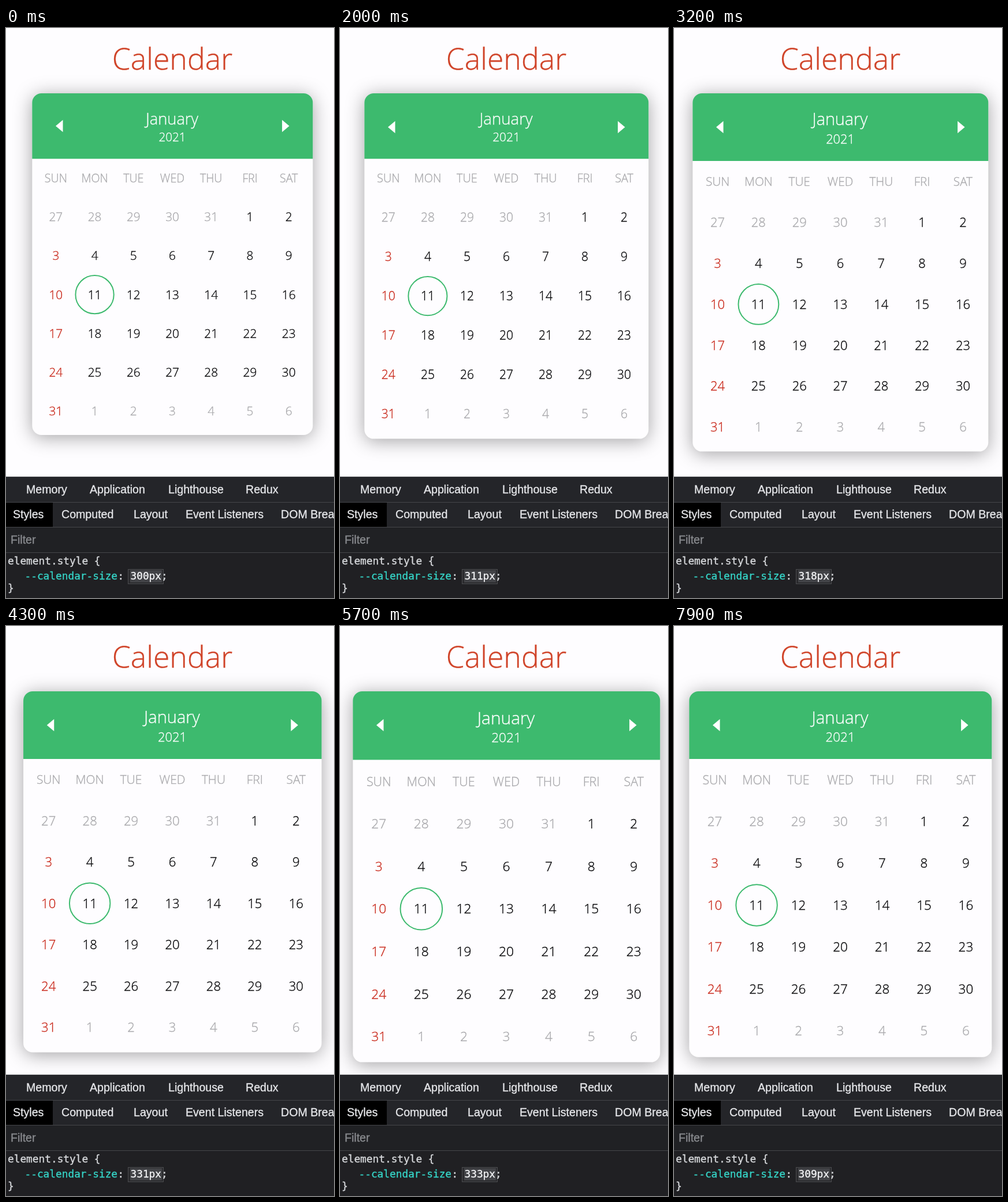
These frames come from a looping animation (568x986 px, 8000 ms). An HTML page:

```html
<!DOCTYPE html>
<html lang="en">
<head>
<meta charset="utf-8">
<title>Calendar</title>
<style>
  html, body { margin: 0; width: 100%; height: 100%; overflow: hidden; background: #fefdff; }
  svg { display: block; width: 100%; height: 100%; }
  text { fill: currentColor; stroke: currentColor; stroke-width: .35px; }
  .light { font-family: "Open Sans", sans-serif; font-weight: 300; text-anchor: middle; }
  .ui { font: 19.6px "Liberation Sans", Arial, sans-serif; color: #e6e7ea; }
  .code { font: 17.8px "DejaVu Sans Mono", monospace; color: #d8dadd; white-space: pre; }
  #card { fill: #fefdff; filter: drop-shadow(0 4px 16px rgba(0, 0, 0, .36)); }
</style>
</head>
<body>
<svg id="stage" viewBox="0 0 568 986" preserveAspectRatio="none">
  <text class="light" x="288" y="71.5" font-size="51.8" color="#d04429">Calendar</text>
  <rect id="card" y="113" rx="16"/>
  <path id="head" fill="#3dba6e"/>
  <path id="arrows" fill="#fff"/>
  <g id="labels" class="light"></g>
  <circle id="ring" fill="none" stroke="#3dba6e" stroke-width="2"/>

  <rect y="776" width="568" height="210" fill="#242529"/>
  <rect y="907" width="568" height="79" fill="#202023"/>
  <rect y="864" width="568" height="43" fill="#202124"/>
  <rect y="821" width="81" height="42" fill="#000"/>
  <path d="M0 776.5H568M0 820.5H568M0 863.5H568M0 907.5H568" stroke="#45464a"/>
  <g id="tabs" class="ui"></g>
  <text class="ui" x="8" y="892" style="color:#898b8f">Filter</text>
  <g class="code">
    <text x="3" y="927.5">element.style {</text>
    <text x="32.5" y="953.5" color="#35d4c7">--calendar-size</text>
    <text x="193.5" y="953.5">:</text>
    <rect x="211.5" y="936.5" width="61" height="25" fill="#2a2a2d" stroke="#4c4d50"/>
    <rect x="215" y="938" width="55" height="21" fill="#424347"/>
    <text id="value" x="215.5" y="953.5" color="#f4f5f7"></text>
    <text x="269" y="953.5">;</text>
    <text x="3" y="975">}</text>
  </g>
</svg>
<script>
const LOOP = 8000, STEP = 100, CX = 288, TOP = 113, R = 16;
const $ = id => document.getElementById(id);

// [time, value] points: the typed property and the card width that eases after it
const typed = [[0, 300], [400, 305], [1000, 305], [1240, 302], [1300, 302], [2000, 311],
  [2560, 318], [3260, 318], [4300, 331], [4860, 338], [5260, 333], [5980, 333],
  [6700, 324], [7900, 309]];
const widths = [[0, 486], [400, 488], [900, 493], [1500, 494], [2000, 492], [2500, 499],
  [3200, 512], [3700, 514.5], [4300, 516.5], [4800, 520], [5700, 532], [6100, 537],
  [6700, 534.5], [7300, 530], [7900, 524]];

function sample(points, t) {
  const i = points.findIndex(p => p[0] > t);
  if (i < 0) return points[points.length - 1][1];
  const [t0, a] = points[i - 1], [t1, b] = points[i];
  return a + (b - a) * (t - t0) / (t1 - t0);
}

function set(el, attrs) {
  for (const key in attrs) el.setAttribute(key, attrs[key]);
}

function addText(parent, text, attrs) {
  const el = document.createElementNS("http://www.w3.org/2000/svg", "text");
  el.textContent = text;
  set(el, attrs);
  return parent.appendChild(el);
}

function place(el, x, middle, size) {
  set(el, { x, y: middle + size * .357, "font-size": size });
}

[["Memory", 35], ["Application", 145], ["Lighthouse", 281], ["Redux", 415]]
  .forEach(([name, x]) => addText($("tabs"), name, { x, y: 805 }));
[["Styles", 12], ["Computed", 96], ["Layout", 221], ["Event Listeners", 311], ["DOM Breakpoints", 476]]
  .forEach(([name, x]) => addText($("tabs"), name, { x, y: 848 }));

const month = addText($("labels"), "January", { color: "#fff" });
const year = addText($("labels"), "2021", { color: "#fff" });
const weekdays = ["SUN", "MON", "TUE", "WED", "THU", "FRI", "SAT"]
  .map(name => addText($("labels"), name, { color: "#a9a9ac" }));
const days = Array.from({ length: 42 }, (_, i) => {
  const day = new Date(2021, 0, i - 4);
  const color = day.getMonth() ? "#a9a9ac" : i % 7 ? "#08080a" : "#c92a1c";
  return addText($("labels"), day.getDate(), { color });
});

function draw(t) {
  const w = sample(widths, t), left = CX + .3 - w / 2, right = left + w;
  // header text snaps to whole line heights
  const snap = w < 502 ? 0 : w < 528 ? 1 : 2;
  const base = TOP + [113.3, 117, 118.5][snap];
  const weekY = [260, 266, 269][snap];
  const pitch = w * .1383;
  const column = i => CX + (i % 7 - 3) * pitch;
  const row = i => weekY + (Math.floor(i / 7) + 1) * pitch - .5;

  set($("card"), { x: left, width: w, height: 591 + 1.1 * (w - 486) });
  set($("head"), { d: `M${left} ${base}V${TOP + R}a${R} ${R} 0 0 1 ${R} ${-R}` +
    `H${right - R}a${R} ${R} 0 0 1 ${R} ${R}V${base}z` });
  const ay = w < 490 ? 169.5 : 171.5;
  set($("arrows"), { d: `M${left + 40.7} ${ay}l12.5 -10.5v21zM${right - 40.7} ${ay}l-12.5 -10.5v21z` });

  place(month, CX - .5, [157, 158, 159.5][snap], w * .0562);
  place(year, CX, [189, 192, 193.3][snap], w * .0425);
  weekdays.forEach((el, i) => place(el, column(i), weekY, w * .0405));
  days.forEach((el, i) => place(el, column(i), row(i), w * .0428));
  set($("ring"), { cx: column(15), cy: row(15), r: w * .0682 });
  $("value").textContent = Math.round(sample(typed, t)) + "px";
}

function tick() {
  const t = performance.now() % LOOP;
  draw(Math.floor(t / STEP) * STEP);
  requestAnimationFrame(tick);
}
tick();
</script>
</body>
</html>
```
